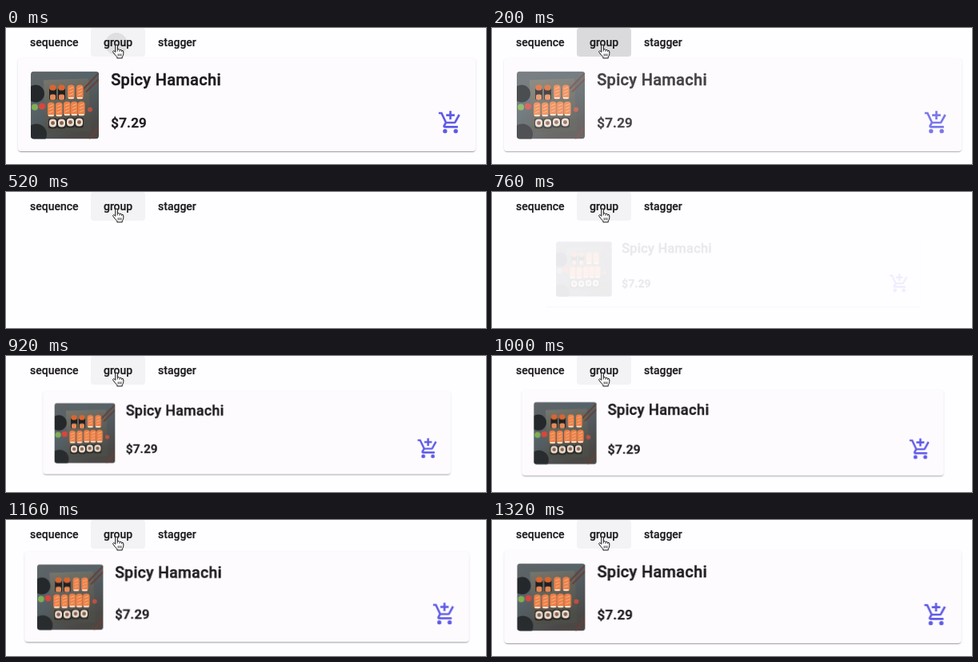
These frames come from a looping animation (600 by 171 pixels, 1.44 s). An HTML page:

```html
<!DOCTYPE html>
<html lang="en">
<head>
<meta charset="utf-8">
<title>Group animation</title>
<style>
  html, body { margin: 0; width: 100%; height: 100%; overflow: hidden; background: #fefdff; }
  .stage { position: relative; width: 600px; height: 171px; overflow: hidden; font-family: Roboto, sans-serif; font-weight: 500; }
  svg { position: absolute; left: 0; top: 0; overflow: visible; }
  text { fill: #1d1b1f; stroke: #1d1b1f; stroke-width: .2px; }
  .card text { stroke-width: .45px; }

  .tab { position: absolute; left: 106px; top: 0; width: 68px; height: 36px; border-radius: 4px; background: #f3f2f4; overflow: hidden; }
  .ripple {
    position: absolute; left: -10px; top: -22px; width: 84px; height: 84px; border-radius: 50%; background: #000;
    animation: grow 1440ms infinite, dim 1440ms linear infinite;
  }
  .card {
    position: absolute; left: 14.5px; top: 38px; width: 572px; height: 117px; border-radius: 4px; background: #fdfbfe;
    box-shadow: 0 2px 1px -1px rgba(0,0,0,.2), 0 1px 1px rgba(0,0,0,.14), 0 1px 3px rgba(0,0,0,.12);
    animation: fade 1440ms infinite, zoom 1440ms infinite;
  }

  @keyframes grow {
    0% { transform: scale(.32); animation-timing-function: cubic-bezier(.1,.4,.3,1); }
    13.9%, 100% { transform: scale(1); }
  }
  @keyframes dim {
    0% { opacity: .08; }
    8%, 25.7% { opacity: .105; }
    36.1%, 100% { opacity: 0; }
  }
  @keyframes fade {
    0%, 6.46% { opacity: 1; animation-timing-function: ease-in; }
    27.4%, 49.3% { opacity: 0; animation-timing-function: ease-in; }
    63.2%, 100% { opacity: 1; }
  }
  @keyframes zoom {
    0%, 28% { transform: scale(1); animation-timing-function: step-start; }
    28.1%, 50.4% { transform: scale(.8); animation-timing-function: ease-out; }
    94.9%, 100% { transform: scale(1); }
  }
</style>
</head>
<body>
<div class="stage">
  <div class="tab"><div class="ripple"></div></div>

  <div class="card">
    <svg width="572" height="117">
      <defs>
        <clipPath id="frame"><rect width="85" height="85" rx="4"/></clipPath>
        <linearGradient id="slate" x2=".6" y2="1">
          <stop stop-color="#5f6467"/>
          <stop offset=".45" stop-color="#566369"/>
          <stop offset="1" stop-color="#4a4745"/>
        </linearGradient>
        <linearGradient id="board" x2=".3" y2="1">
          <stop stop-color="#77776e"/>
          <stop offset="1" stop-color="#4c4d47"/>
        </linearGradient>
        <g id="nigiri">
          <rect width="8.6" height="18" rx="3.5" fill="#ee8148"/>
          <path d="M2 5l5-2M2 9l5-2M2 13l5-2" stroke="#f6b68c"/>
          <path d="M1 16.5h6.6" stroke="#f3e3d3" stroke-width="2"/>
        </g>
        <g id="gunkan">
          <rect y="4" width="9" height="15" rx="2" fill="#1f2022"/>
          <rect x=".5" width="8" height="7" rx="3" fill="#d9652f"/>
          <rect x="1" y="12" width="7" height="7" rx="2" fill="#e58a58"/>
        </g>
        <g id="roll">
          <rect width="11" height="13" rx="3" fill="#2c2a28"/>
          <rect x="1" y="1" width="9" height="10" rx="4" fill="#e9dfd2"/>
          <circle cx="5.5" cy="6" r="2.4" fill="#8b5f4b"/>
        </g>
      </defs>

      <g transform="translate(16 16.5)" clip-path="url(#frame)">
        <rect width="85" height="85" fill="url(#slate)"/>
        <path d="M16 11L72 9L75 75L18 77Z" fill="url(#board)"/>
        <circle cx="6" cy="28" r="11" fill="#24282b"/>
        <circle cx="7" cy="79" r="13" fill="#292c2f"/>
        <path d="M66 22L87 0M69 26L87 8M73 85L87 68" stroke="#684036" stroke-width="2"/>
        <circle cx="5" cy="45" r="4" fill="#7fae55"/>
        <circle cx="14" cy="44" r="4" fill="#d9463c"/>
        <circle cx="74" cy="48" r="3" fill="#bc5140"/>
        <use href="#gunkan" x="23" y="17"/>
        <use href="#gunkan" x="34" y="17"/>
        <use href="#nigiri" x="46" y="17"/>
        <use href="#nigiri" x="57" y="17"/>
        <use href="#nigiri" x="21" y="39"/>
        <use href="#nigiri" x="31" y="39"/>
        <use href="#nigiri" x="41" y="38"/>
        <use href="#nigiri" x="50" y="38"/>
        <use href="#nigiri" x="59" y="38"/>
        <use href="#roll" x="22" y="59"/>
        <use href="#roll" x="33" y="59"/>
        <use href="#roll" x="44" y="58"/>
        <use href="#roll" x="55" y="58"/>
      </g>

      <text x="116.2" y="34" font-size="20" letter-spacing=".31">Spicy Hamachi</text>
      <text x="116.2" y="87" font-size="17" letter-spacing=".3">$7.29</text>

      <g transform="translate(524.5 65) scale(1.333)" fill="none" stroke="#5f5be6" stroke-width="2">
        <path d="M12 1V9M8 5H16M1 3H3.65L7.9 12H15.55Q16.2 12 16.5 11.5L20.3 4.5M7.8 12L6.1 15Q5.8 16 7 16H19"/>
        <g fill="#5f5be6" stroke="none"><circle cx="7" cy="20" r="2"/><circle cx="17" cy="20" r="2"/></g>
      </g>
    </svg>
  </div>

  <svg width="600" height="171">
    <g font-size="14">
      <text x="30" y="23">sequence</text>
      <text x="122" y="23">group</text>
      <text x="190" y="23">stagger</text>
    </g>
    <g transform="translate(132.8 20.4)" stroke="#111" stroke-linejoin="round">
      <path fill="#fff" d="M4 10V2.2Q4 .7 5.3 .7T6.6 2.2V6.5Q9 5.6 9.3 7.2Q11.6 6.4 11.8 8Q14 7.6 14 9.5V12Q14 14 12.5 16V17.5H6V16Q3.5 13.5 1.2 10.3Q.3 8.8 1.6 8.3Q2.6 8 4 10Z"/>
      <path fill="none" stroke-width=".8" d="M6.6 6.5V9M9.3 7.2V9.4M11.8 8V9.8M7.4 12V15M9.3 12V15M11.2 12V15"/>
    </g>
  </svg>
</div>
</body>
</html>
```
